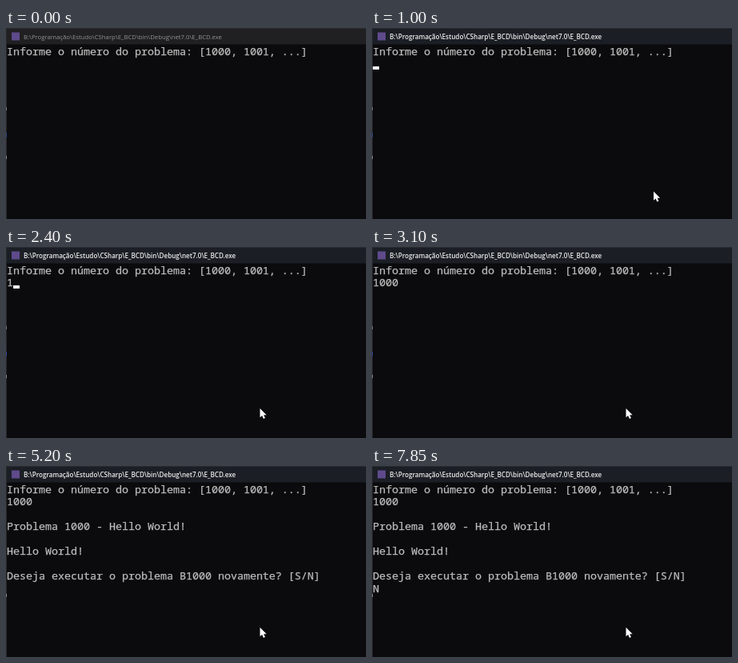
Write an HTML page that moves like this. It is 450 px wide and 239 px high and loops after 8 s.

```html
<!DOCTYPE html>
<html lang="pt-BR">
<head>
<meta charset="utf-8">
<title>Console</title>
<style>
  html, body { margin: 0; width: 100%; height: 100%; overflow: hidden; background: #0b0a0c; }
  svg { display: block; width: 450px; height: 239px; }
  #title { font: 7.75px "Open Sans", "Noto Sans", sans-serif; fill: #929294; }
  #bar { fill: #201f21; }
  .active #title { font-weight: 600; font-size: 8.08px; fill: #ececec; }
  .active #bar { fill: #1b1f25; }
  #lines { font: 13.333px "Noto Sans Mono", "DejaVu Sans Mono", monospace; fill: #bcbcbc; stroke: #bcbcbc; stroke-width: .25; }
</style>
</head>
<body>
<svg id="stage" viewBox="0 0 450 239">
  <rect width="450" height="239" fill="#0b0a0c"/>
  <rect id="bar" width="450" height="20.5"/>
  <rect width="450" height="1" fill="#282c31"/>
  <rect width="1" height="239" fill="#29292c"/>
  <g id="marks">
    <rect y="99" width="1" height="4" fill="#77777a"/>
    <rect y="131" width="1" height="6" fill="#2f4690"/>
  </g>
  <rect y="160" width="1" height="4" fill="#8a8a8c"/>
  <rect x="7" y="5.5" width="10" height="10" fill="#5f4a8c"/>
  <text id="title" x="22" y="13.6">B:\Programação\Estudo\CSharp\E_BCD\bin\Debug\net7.0\E_BCD.exe</text>
  <g id="lines"></g>
  <rect id="caret" width="8" height="4" fill="#f2f2f2"/>
  <path id="mouse" d="M0 0V11.2L2.6 8.9L4.4 13L6.4 12.1L4.6 8.2H8.1Z" fill="#fff"/>
</svg>
<script>
const LOOP = 8000, STEP = 50, COL = 8, ROW = 15.5, LEFT = 1;
const FOCUS = 900, ENTER = 3550, ANSWER = 6700;
const KEY_GAP = 165, BLINK = 530.5, BLINK_START = 405, KEY_HOLD = 50;
const $ = id => document.getElementById(id);

// A line with a gap is typed one character per gap, the others appear at once.
const lines = [
  { row: 0, at: 0, text: "Informe o número do problema: [1000, 1001, ...]" },
  { row: 1, at: 2400, text: "1000", gap: KEY_GAP },
  { row: 3, at: ENTER, text: "Problema 1000 - Hello World!" },
  { row: 5, at: ENTER, text: "Hello World!" },
  { row: 7, at: ENTER, text: "Deseja executar o problema B1000 novamente? [S/N]" },
  { row: 8, at: ANSWER, text: "N", gap: KEY_GAP }
];
const [, number, , , , answer] = lines;

const entry = [300, -16];
const legs = [
  { at: 0, span: 700, to: [373, 221] },
  { at: 700, span: 200, to: [352, 204.5] },
  { at: 1050, span: 300, to: [317.5, 202] }
];

for (const line of lines) {
  line.el = document.createElementNS("http://www.w3.org/2000/svg", "text");
  line.el.setAttribute("x", LEFT);
  line.el.setAttribute("y", 33.6 + line.row * ROW);
  $("lines").append(line.el);
}

const strokes = [FOCUS, ENTER];
for (const { at, text, gap } of lines)
  if (gap) for (let i = 0; i < text.length; i++) strokes.push(at + i * gap);

function textAt({ at, text, gap }, t) {
  if (t < at) return "";
  return gap ? text.slice(0, 1 + Math.floor((t - at) / gap)) : text;
}

// Each stroke shows the caret; every later blink tick toggles it.
const ticks = t => Math.floor((t - BLINK_START) / BLINK);
function caretOn(t) {
  const last = Math.max(...strokes.filter(s => s <= t));
  if (last < 0) return false;
  return (ticks(Math.max(t, last + KEY_HOLD)) - ticks(last + KEY_HOLD)) % 2 === 0;
}

const easeOut = k => 1 - (1 - k) ** 3;
function mouseAt(t) {
  return legs.reduce((pos, { at, span, to }) => {
    const k = easeOut(Math.min(1, Math.max(0, (t - at) / span)));
    return pos.map((p, i) => p + (to[i] - p) * k);
  }, entry);
}

function draw(now) {
  const t = Math.floor(now % LOOP / STEP) * STEP;
  const current = t < ENTER ? number : answer;

  $("stage").classList.toggle("active", t >= FOCUS);
  $("marks").style.display = t < ENTER ? "" : "none";
  for (const line of lines) line.el.textContent = textAt(line, t);

  $("caret").setAttribute("x", LEFT + textAt(current, t).length * COL);
  $("caret").setAttribute("y", 48 + (current.row - 1) * ROW);
  $("caret").style.display = caretOn(t) ? "" : "none";
  $("mouse").setAttribute("transform", `translate(${mouseAt(t)})`);
}

const start = performance.now();
function tick() {
  draw(performance.now() - start);
  requestAnimationFrame(tick);
}
tick();
</script>
</body>
</html>
```
